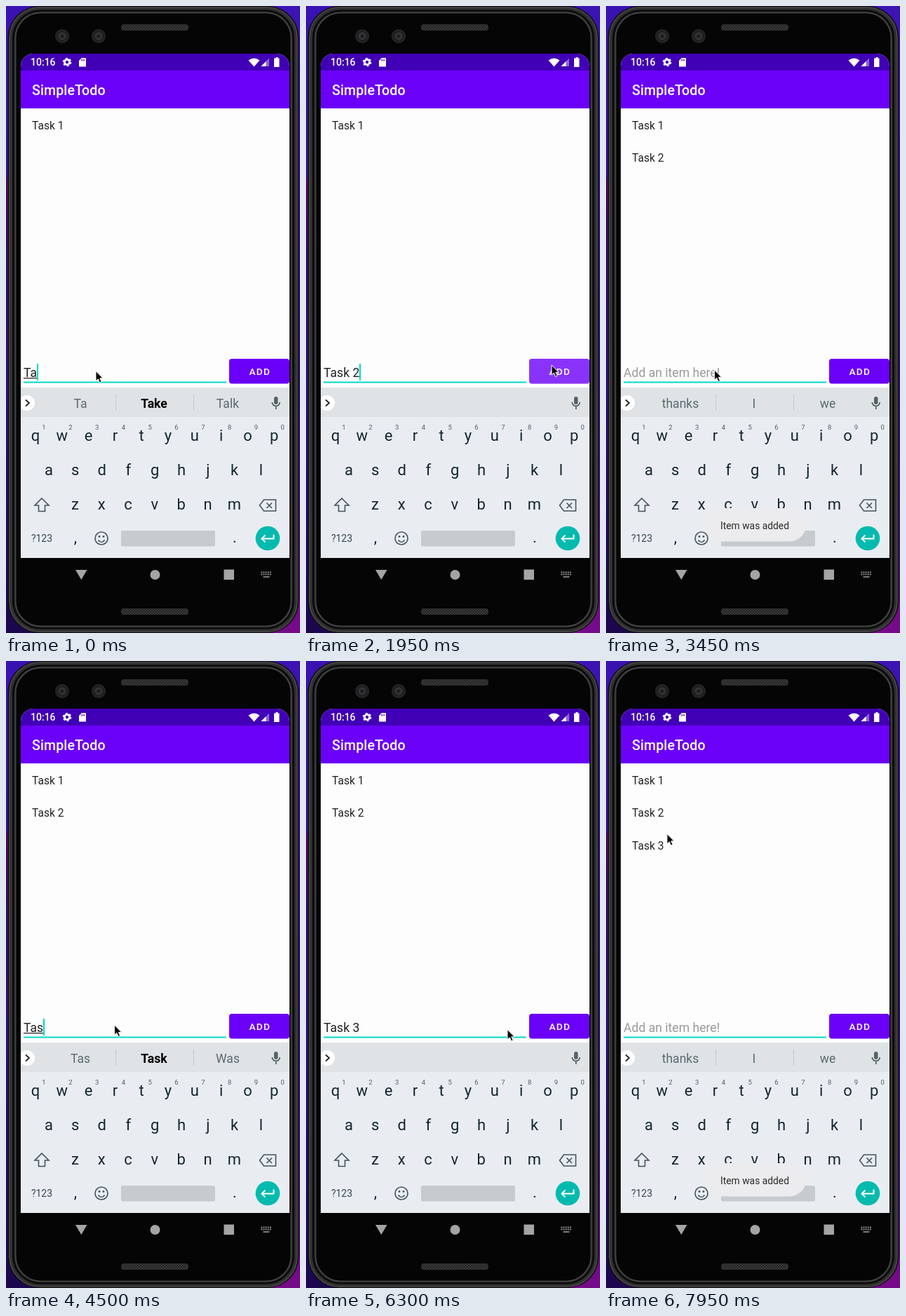
An HTML page that plays this animation: 419x894 px, repeating every 8 s.

```html
<!DOCTYPE html>
<html lang="en">
<head>
<meta charset="utf-8">
<title>SimpleTodo</title>
<style>
  html, body { margin: 0; width: 100%; height: 100%; overflow: hidden; background: #000; }
  svg { display: block; width: 419px; height: 894px; font-family: Roboto, sans-serif; }
  text { white-space: pre; }
  .mid { text-anchor: middle; }
  .line { fill: none; stroke: #44545b; stroke-width: 1.6; }
</style>
</head>
<body>
<svg viewBox="0 0 419 894">
  <defs>
    <linearGradient id="wallLeft" x2="0" y2="1">
      <stop offset="0" stop-color="#3a12b2"/><stop offset=".27" stop-color="#3b12a6"/>
      <stop offset=".28" stop-color="#560a62"/><stop offset=".42" stop-color="#3c0a78"/>
      <stop offset=".6" stop-color="#32109a"/><stop offset="1" stop-color="#1c064c"/>
    </linearGradient>
    <linearGradient id="wallRight" x2="0" y2="1">
      <stop offset="0" stop-color="#3c14b4"/><stop offset=".6" stop-color="#3a0f92"/>
      <stop offset="1" stop-color="#760b88"/>
    </linearGradient>
    <radialGradient id="lens">
      <stop offset="0" stop-color="#111"/><stop offset=".45" stop-color="#3a3a3c"/>
      <stop offset=".6" stop-color="#1c1c1e"/><stop offset="1" stop-color="#28282a"/>
    </radialGradient>
    <pattern id="mesh" width="4" height="4" patternUnits="userSpaceOnUse">
      <path fill="#252525" d="M0 0h4v4h-4z"/><path stroke="#393939" d="M0 0l4 4M4 0l-4 4"/>
    </pattern>
    <clipPath id="screen"><path d="M21 86a18 18 0 0 1 18-18h347a18 18 0 0 1 18 18v749H21z"/></clipPath>
  </defs>

  <!-- device -->
  <path fill="url(#wallLeft)" d="M0 0h210v894H0z"/>
  <path fill="url(#wallRight)" d="M209 0h210v894H209z"/>
  <rect x="2.500" width="415" height="894" rx="45" fill="#101010"/>
  <rect x="5" y="2" width="410" height="890" rx="43" fill="#303030" stroke="#4a4a4a" stroke-width="1.500"/>
  <rect x="10" y="6.500" width="400" height="881" rx="39" fill="#161616" stroke="#0a0a0a" stroke-width="2"/>
  <rect x="13.500" y="9.500" width="393" height="875" rx="36" fill="#050505" stroke="#444" stroke-width="2"/>
  <rect x="164" y="26" width="96" height="9" rx="4" fill="url(#mesh)"/>
  <rect x="164" y="859" width="96" height="9" rx="4" fill="url(#mesh)"/>
  <circle cx="80" cy="43" r="10" fill="url(#lens)"/>
  <circle cx="132" cy="43" r="10" fill="url(#lens)"/>

  <!-- app -->
  <g clip-path="url(#screen)">
    <path fill="#fdfdfd" d="M21 68h383v719H21z"/>
    <path fill="#6b00f8" d="M21 91h383v55H21z"/>
    <path fill="#4100b6" d="M21 68h383v24H21z"/>
    <path fill="#e9edf1" d="M21 544h383v243H21z"/>
    <path fill="#dfe3e6" d="M21 544h383v42H21z"/>
    <circle cx="30" cy="566" r="11" fill="#fff"/>
  </g>
  <g fill="#fff">
    <text x="35" y="85" font-size="14" font-weight="500">10:16</text>
    <text x="37" y="126.500" font-size="19.600" font-weight="500" letter-spacing=".1">SimpleTodo</text>
    <circle cx="87" cy="80" r="3.600" fill="none" stroke="#fff" stroke-width="2.800"/>
    <circle cx="87" cy="80" r="5.400" fill="none" stroke="#fff" stroke-width="1.800" stroke-dasharray="2.800 2.855"/>
    <path d="M108 74h5q1 0 1 1v10.500q0 1-1 1h-8q-1 0-1-1V78z"/>
    <path stroke="#4100b6" d="M107.500 76v2.500m2-2.500v2.500m2-2.500v2.500"/>
    <path d="M345.500 77.500q8-6 16 0l-8 9z"/>
    <path d="M375 74.500v11.500h-11.500z" opacity=".4"/>
    <path d="M370.500 79v7h-7z"/>
    <path d="M384.500 73h3v1.500h2V87h-7.500V74.500h2.500z"/>
  </g>
  <g id="tasks" font-size="15.600" fill="#222">
    <text x="37" y="175.500">Task 1</text>
    <text x="37" y="222">Task 2</text>
    <text x="37" y="269">Task 3</text>
  </g>
  <path fill="#03dac5" d="M25 535.500h289v2H25z"/>
  <text id="hint" x="25" y="528.500" font-size="17.600" fill="#9a9a9a">Add an item here!</text>
  <text id="typed" x="25" y="528.500" font-size="17.600" fill="#222"></text>
  <rect id="underline" x="25" y="530" height="1.200" fill="#222"/>
  <rect id="caret" y="510" width="2" height="24" fill="#03dac5"/>
  <rect x="318" y="503" width="86" height="35.500" rx="4" fill="#6b00f8"/>
  <rect id="press" x="318" y="503" width="86" height="35.500" rx="4" fill="#fff" opacity=".2"/>
  <text x="346.500" y="526" font-size="13.700" font-weight="500" letter-spacing="1.200" fill="#fff">ADD</text>

  <!-- keyboard -->
  <path d="M28 561.500l5 4.500-5 4.500" fill="none" stroke="#222" stroke-width="1.800"/>
  <g id="suggestions" class="mid" font-size="17.600">
    <path id="dividers" stroke="#c2c8cc" d="M156.500 554v23M267.500 554v23"/>
    <text x="106" y="572.500"></text><text x="211" y="572.500"></text><text x="316" y="572.500"></text>
  </g>
  <rect x="382" y="557" width="5.500" height="11" rx="2.700" fill="#53636a"/>
  <path class="line" d="M379.300 565a5.400 5.400 0 0 0 10.900 0M384.800 571v4"/>
  <g id="keys" class="mid" font-size="22" fill="#14262e"></g>
  <text class="mid" x="51" y="764" font-size="14" fill="#34454c">?123</text>
  <path class="line" d="M51 702l10 10h-5.500v8.500h-9V712H41z"/>
  <path class="line" d="M367.500 704h17v16h-17l-6-8zM371.500 708.500l7.500 7.500m0-7.500l-7.500 7.500"/>
  <circle class="line" cx="136" cy="759" r="9"/>
  <path class="line" d="M131.500 761.500q4.500 6 9 0"/>
  <circle cx="133" cy="756.500" r="1.400" fill="#44545b"/><circle cx="139" cy="756.500" r="1.400" fill="#44545b"/>
  <rect x="164" y="748" width="134" height="22.500" rx="2" fill="#c6cbcf"/>
  <circle cx="373" cy="759" r="17.300" fill="#02baae"/>
  <path d="M381.500 753.500v6H365m4.500-5l-5 5 5 5" fill="none" stroke="#fff" stroke-width="2"/>

  <!-- navigation bar -->
  <g fill="#a4a4a4">
    <path d="M99 804h16.500l-8.200 14z"/>
    <circle cx="212.500" cy="811" r="7"/>
    <path d="M310.500 803.500h14.500v14.500h-14.500z"/>
    <path fill="none" stroke="#999" stroke-width="1.800" stroke-dasharray="1.800 1.300" d="M363.500 807.500h15M363.500 810.500h15"/>
    <path fill="none" stroke="#999" stroke-width="1.600" d="M366.500 814h9"/>
  </g>

  <g id="toast">
    <rect x="140" y="716" width="145" height="47.500" rx="23.500" fill="#ecebed"/>
    <text class="mid" x="212" y="745.500" font-size="13.850" fill="#2b2b2b">Item was added</text>
  </g>
  <path id="pointer" fill="#000" stroke="#fff" stroke-width="1"
    d="M0 0v14.200l3.300-3 2.300 5.300 2.500-1.100-2.300-5.100h4.400z"/>
</svg>
<script>
const $ = id => document.getElementById(id);
const show = (el, on) => el.style.display = on ? '' : 'none';

// Keys: letters, first centre, baseline
const rows = [['qwertyuiop', 42, 619.5], ['asdfghjkl', 61, 668.5], ['zxcvbnm', 98.5, 718]];
const key = (x, y, label, attrs = '') => `<text x="${x}" y="${y}" ${attrs}>${label}</text>`;
let keys = key(99, 765, ',') + key(326, 765, '.');
rows.forEach(([letters, x, y], row) => [...letters].forEach((letter, i) => {
  const cx = x + i * 37.8;
  keys += key(cx, y, letter);
  if (!row) keys += key(cx + 12, 604, (i + 1) % 10, 'font-size="9.5" fill="#4f5f66"');
}));
$('keys').innerHTML = keys;

const words = {
  '': ['thanks', 'I', 'we'],
  'T': ['T', 'The', 'Thank'],
  'Ta': ['Ta', 'Take', 'Talk'],
  'Tas': ['Tas', 'Task', 'Was'],
  'Task': ['Tasks', 'Task', 'Talk'],
  'Task ': ['force', 'and', 'is']
};

// Tracks hold each value from its start time in ms
const typing = [[0, 'Ta'], [300, 'Tas'], [600, 'Task'], [750, 'Task '], [900, 'Task 2'], [2100, ''],
  [4050, 'T'], [4200, 'Ta'], [4500, 'Tas'], [4950, 'Task'], [5400, 'Task '], [5850, 'Task 3'], [7200, '']];
const caretOn = [[0, 1], [1350, 0], [1950, 1], [2700, 0], [3000, 1], [3450, 0], [4050, 1],
  [6150, 0], [6750, 1], [7650, 0]];
const pressed = [[0, 0], [1950, 1], [2250, 0], [7050, 1], [7350, 0]];
const taskCount = [[0, 1], [2100, 2], [7200, 3]];
const toastAlpha = [[0, 0], [2250, .6], [2400, 1], [4350, .5], [4500, 0], [7350, .6], [7500, 1]];
const pointerAt = [[0, [128, 520.5]], [1350, [140, 520]], [1500, [262, 517]], [1650, [350, 512]],
  [2400, [326, 520]], [2550, [236, 537]], [2700, [175, 535]], [3000, [172, 534]], [3150, [164, 527]],
  [3300, [157, 521]], [3450, [154.5, 519]], [6150, [170, 522]], [6300, [287, 525.5]], [6450, [330, 527]],
  [6600, [342, 520]], [6750, [343, 514]], [7500, [320, 480]], [7650, [230, 380]], [7800, [120, 275]],
  [7950, [87, 246.5]]];
const valueAt = (track, t) => track.findLast(([start]) => start <= t)[1];

const typed = $('typed');
const slots = $('suggestions').querySelectorAll('text');

function draw() {
  const t = performance.now() % 8000;
  const text = valueAt(typing, t);
  const composing = text && !text.includes(' ');
  typed.textContent = text;
  const width = text ? typed.getComputedTextLength() : 0;
  show($('hint'), !text);
  $('underline').setAttribute('width', composing ? width : 0);
  $('caret').setAttribute('x', Math.round(25 + width));
  show($('caret'), valueAt(caretOn, t));

  const choices = words[text];
  show($('suggestions'), choices);
  slots.forEach((slot, i) => {
    const best = composing && i === 1;
    slot.textContent = choices ? choices[i] : '';
    slot.setAttribute('fill', best ? '#000' : '#5a696f');
    slot.setAttribute('font-weight', best ? 700 : 400);
  });

  [...$('tasks').children].forEach((task, i) => show(task, i < valueAt(taskCount, t)));
  show($('press'), valueAt(pressed, t));
  $('toast').setAttribute('opacity', valueAt(toastAlpha, t));
  $('pointer').setAttribute('transform', `translate(${valueAt(pointerAt, t)})`);
  requestAnimationFrame(draw);
}
draw();
</script>
</body>
</html>
```
